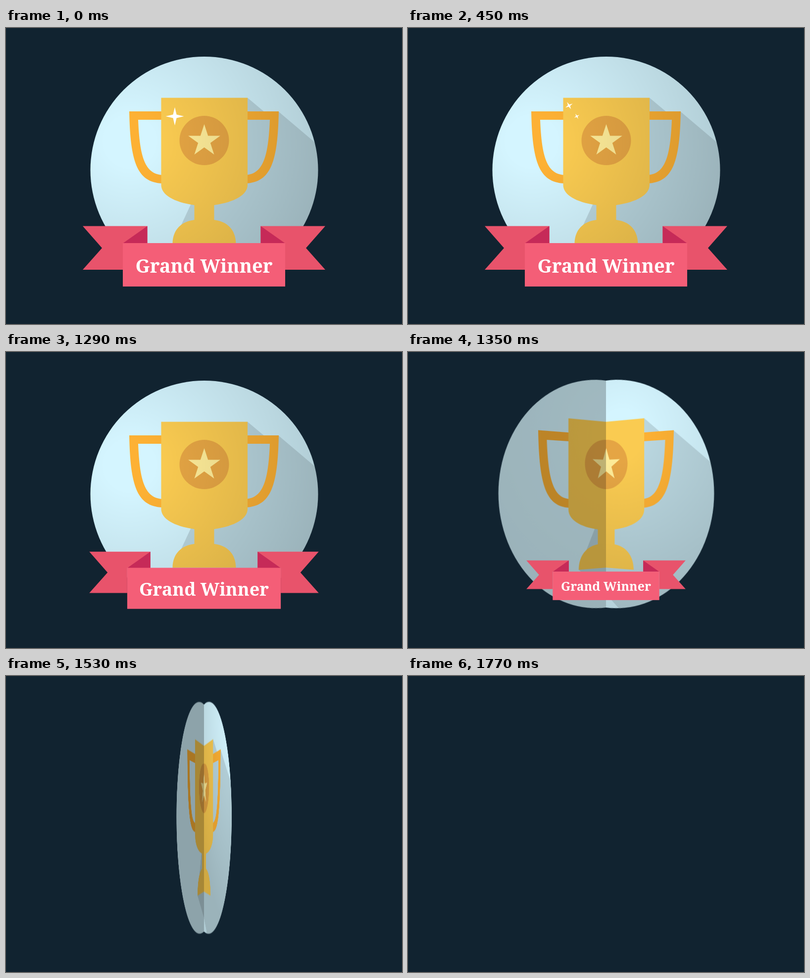
Recreate the animation shown at these times as an HTML page with a canvas. Size 800 by 600 pixels, loop 2.7 s.

```html
<!DOCTYPE html>
<html lang="en">
<head>
<meta charset="utf-8">
<title>Grand Winner</title>
<style>
html, body { margin: 0; width: 100%; height: 100%; overflow: hidden; background: #112330; }
canvas { display: block; width: 800px; height: 600px; }
</style>
</head>
<body>
<canvas id="stage" width="800" height="600"></canvas>
<script>
const W = 800, H = 600, LOOP = 2700, STEP = 30;
const HINGE = 400, EYE_Y = 300, DEPTH = 1100;
const DISC = { x: 400.5, y: 288, r: 230 };

const ctx = document.getElementById('stage').getContext('2d');
const layer = () => {
  const c = document.createElement('canvas');
  c.width = W;
  c.height = H;
  return c.getContext('2d');
};
const art = layer(), lit = layer();
ctx.imageSmoothingQuality = 'high';

const clamp = v => Math.max(0, Math.min(1, v));

function fillPath(c, color, d, rule) {
  c.fillStyle = color;
  c.fill(new Path2D(d), rule || 'nonzero');
}

function circle(c, color, x, y, r) {
  c.fillStyle = color;
  c.beginPath();
  c.arc(x, y, r, 0, Math.PI * 2);
  c.fill();
}

function star(c, color, x, y, points, outer, inner, turn) {
  c.fillStyle = color;
  c.beginPath();
  for (let i = 0; i < points * 2; i++) {
    const a = turn - Math.PI / 2 + i * Math.PI / points;
    const r = i % 2 ? inner : outer;
    c.lineTo(x + r * Math.cos(a), y + r * Math.sin(a));
  }
  c.closePath();
  c.fill();
}

// Runs a drawing twice, the second time flipped around the hinge.
function mirrored(c, draw) {
  draw();
  c.save();
  c.translate(W, 0);
  c.scale(-1, 1);
  draw();
  c.restore();
}

function paintArt(c) {
  circle(c, '#d4f5ff', DISC.x, DISC.y, DISC.r);

  c.globalCompositeOperation = 'source-atop';
  fillPath(c, 'rgba(0,0,0,.12)',
    'M488 141.5L523 171L550 169L720 313.5V600H530L336.5 437L400 300Z');
  c.globalCompositeOperation = 'source-over';

  mirrored(c, () => fillPath(c, '#fdb134',
    'M249 169H316V315C264 313 251 270 249 169Z' +
    'M267 186H316V298C281 296 270 262 267 186Z', 'evenodd'));

  fillPath(c, '#facb51',
    'M313.5 141.5H488V318C488 338 462 353 420.5 359V389' +
    'C446 392 464 408 464.5 437H336.5C337 408 355 392 380.5 389V359' +
    'C339 353 313.5 338 313.5 318Z');
  circle(c, '#e5a544', 400.5, 228, 50);
  star(c, '#fdeb98', 400.5, 229, 5, 34, 13, 0);
}

// Light moves to the right while the left panel falls into shade.
function paintLight(c, fold) {
  const x = 250 + 500 * fold, y = 230 - 160 * fold;
  const dark = clamp(fold / 0.5);
  const glow = c.createRadialGradient(x, y, 50, x, y, 400);
  glow.addColorStop(0, 'rgba(0,0,0,0)');
  glow.addColorStop(1, 'rgba(0,0,0,.17)');

  c.globalCompositeOperation = 'copy';
  c.drawImage(art.canvas, 0, 0);
  c.globalCompositeOperation = 'source-atop';
  c.fillStyle = glow;
  c.fillRect(HINGE, 0, W - HINGE, H);
  c.globalAlpha = 1 - dark;
  c.fillRect(0, 0, HINGE, H);
  c.globalAlpha = dark;
  c.fillStyle = 'rgba(0,0,0,.335)';
  c.fillRect(0, 0, HINGE, H);
  c.globalAlpha = 1;
}

// Projects both panels, one screen column at a time.
function paintPanels(fold) {
  const angle = fold * Math.PI / 2;
  const cos = Math.cos(angle), sin = Math.sin(angle);
  const toFlat = x => x * DEPTH / (DEPTH * cos + x * sin);
  for (let i = 0; i < HINGE; i++) {
    const a = toFlat(i), b = Math.min(toFlat(i + 1), HINGE);
    if (a >= HINGE || b <= a) break;
    const s = DEPTH / (DEPTH - (a + b) / 2 * sin);
    const top = EYE_Y - EYE_Y * s;
    ctx.drawImage(lit.canvas, HINGE + a, 0, b - a, H, HINGE + i, top, 1, H * s);
    ctx.drawImage(lit.canvas, HINGE - b, 0, b - a, H, HINGE - i - 1, top, 1, H * s);
  }
}

function paintRibbon(size) {
  if (size <= 0) return;
  ctx.save();
  ctx.translate(400, 462.5);
  ctx.scale(size, size);
  ctx.translate(-400, -462.5);
  mirrored(ctx, () => {
    fillPath(ctx, '#e8536b', 'M155 401.5H285.5V436H236V490H155L194 446Z');
    fillPath(ctx, '#c62a58', 'M285.5 401.5V436.5H236Z');
  });
  ctx.fillStyle = '#f45e77';
  ctx.fillRect(236, 436, 328, 88);
  ctx.fillStyle = '#fff';
  ctx.font = 'bold 38px "Noto Serif", serif';
  ctx.textAlign = 'center';
  ctx.fillText('Grand Winner', 400, 496);
  ctx.restore();
}

function paintSparkles(t) {
  if (t >= 930) return;
  const u = Math.max(0, (t - 210) / 720);
  const size = Math.exp(-3.42 * u);
  const turn = (1 - size) * Math.PI / 2;
  const sparkle = (x, y, r) => star(ctx, '#fff', x, y, 4, r * size, r * size * 0.27, turn);
  sparkle(341, 179, 18.5);
  if (t >= 90) sparkle(325.3, 157.3, 26);
}

function paint(t) {
  ctx.fillStyle = '#112330';
  ctx.fillRect(0, 0, W, H);
  if (t >= 1770) return;

  const fold = t > 1300 ? 1 - Math.exp((1300 - t) / 110) : 0;
  const lift = 1 + 0.117 * clamp((t - 1530) / 210) ** 2;
  const shrink = clamp((t - 1260) / 170) ** 1.68;

  paintLight(lit, fold);
  ctx.save();
  ctx.translate(400, 325);
  ctx.scale(lift, lift);
  ctx.translate(-400, -325);
  paintPanels(fold);
  ctx.restore();
  paintSparkles(t);
  paintRibbon(1 - shrink);
}

paintArt(art);
const start = performance.now();
function tick() {
  const t = (performance.now() - start) % LOOP;
  paint(Math.floor(t / STEP) * STEP);
  requestAnimationFrame(tick);
}
tick();
</script>
</body>
</html>
```
